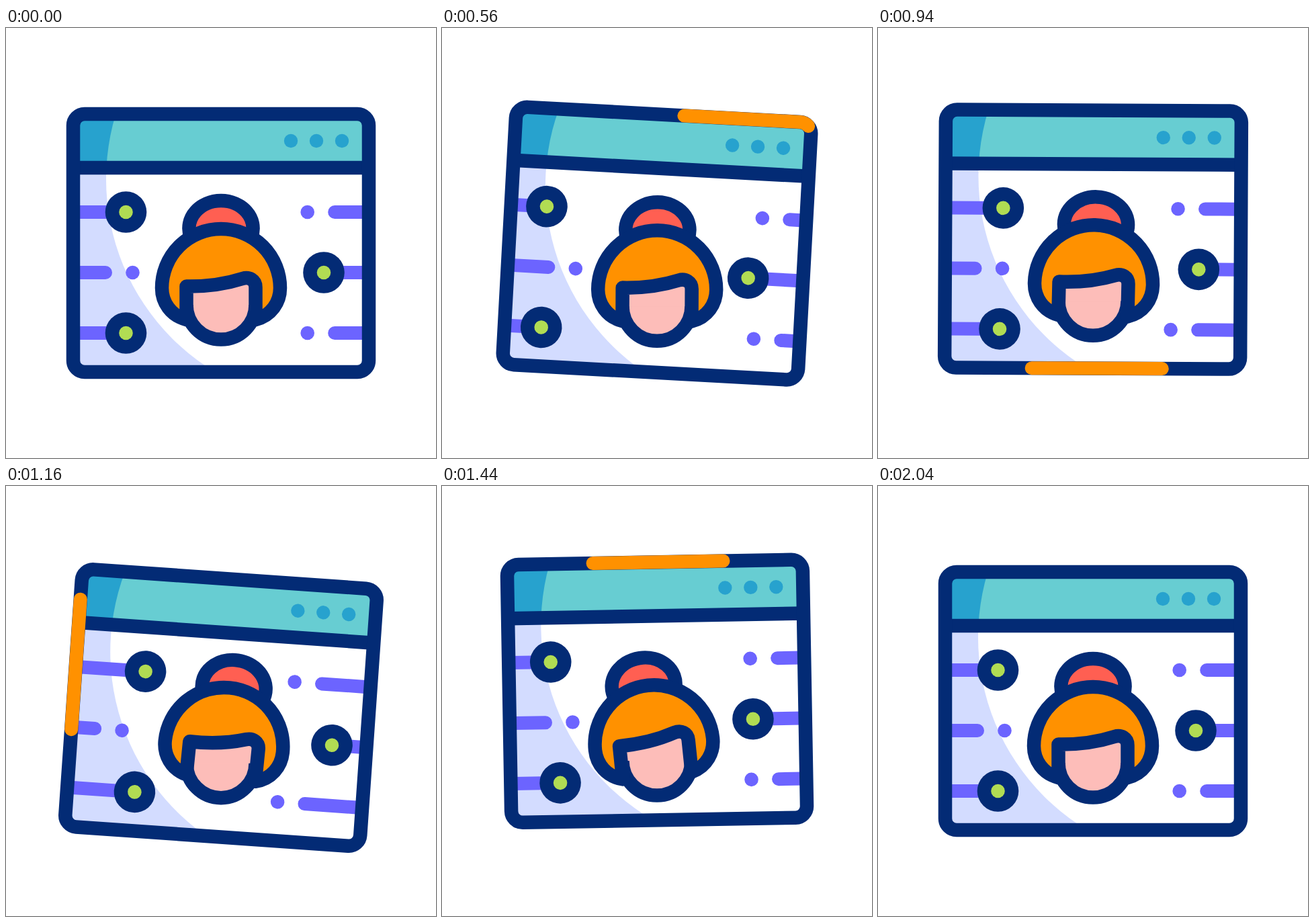
An HTML page that plays this animation: 640x640 px, repeating every 2.26 s.

```html
<!DOCTYPE html>
<html lang="en">
<head>
<meta charset="utf-8">
<title>Avatar editor window</title>
<style>
  html, body { margin: 0; width: 100%; height: 100%; overflow: hidden; background: #fff; }
  svg { display: block; width: 100%; height: 100%; }
  .line { fill: none; stroke: #032b75; stroke-width: 20.5; stroke-linejoin: round; }
  .rail { stroke: #6c64ff; stroke-width: 20; stroke-linecap: round; }
  .bead { fill: #6c64ff; }
  .navy { fill: #032b75; }
  .green { fill: #b1dc53; }
  .skin { fill: #fdbdb9; }
</style>
</head>
<body>
<svg viewBox="0 0 640 640">
  <defs>
    <clipPath id="pane"><rect x="100" y="128" width="440" height="384" rx="17"/></clipPath>
    <mask id="shade">
      <rect width="640" height="640" fill="#fff"/>
      <circle cx="484" cy="225" r="335" fill="#000"/>
    </mask>
  </defs>

  <g id="win">
    <g clip-path="url(#pane)">
      <rect x="100" y="128" width="440" height="384" fill="#fff"/>
      <rect x="100" y="128" width="440" height="80" fill="#67cdd2"/>
      <g mask="url(#shade)">
        <rect x="100" y="128" width="300" height="80" fill="#27a2ce"/>
        <rect x="100" y="208" width="300" height="304" fill="#d3dcff"/>
      </g>
    </g>
    <g fill="#27a2ce">
      <circle cx="424" cy="168" r="10.2"/>
      <circle cx="462" cy="168" r="10.2"/>
      <circle cx="500" cy="168" r="10.2"/>
    </g>
    <g id="sliders"></g>
    <path class="line" d="M100 208H540"/>
    <rect class="line" x="100" y="128" width="440" height="384" rx="17"/>
    <path id="comet" fill="none" stroke="#ff9100" stroke-width="20" stroke-linecap="round"/>
    <g id="knobs"></g>
  </g>

  <g id="head">
    <g id="bun">
      <path class="line" style="fill:#ff5f52" d="M275 312C264 282 290 257 320 257S376 282 365 312"/>
    </g>
    <path id="brow" class="skin" d="M268.5 420V384.5C300 385 330 380 352 373C362 370 371.5 375 371.5 386V420Z"/>
    <path class="line" style="fill:#fdbdb9" d="M268.5 412A51.5 51.5 0 0 0 371.5 412"/>
    <path id="hair" class="line" style="fill:#ff9100" d="M268.5 434C245 428 232 408 232 387A88 88 0 0 1 408 387C408 408 395 428 371.5 434V386C371.5 375 362 370 352 373C330 380 300 385 268.5 384.5Z"/>
  </g>
</svg>

<script>
const LOOP = 2260, STEP = 20;
const $ = id => document.getElementById(id);

function add(parent, tag, attrs) {
  const el = document.createElementNS('http://www.w3.org/2000/svg', tag);
  for (const k in attrs) el.setAttribute(k, attrs[k]);
  return parent.appendChild(el);
}

// Smooth curve through [time, value] keys that never overshoots them.
function track(keys) {
  const rise = keys.slice(1).map(([t, v], i) => (v - keys[i][1]) / (t - keys[i][0]));
  const slope = keys.map((_, i) => {
    const a = rise[i - 1] || 0, b = rise[i] || 0;
    return a * b > 0 ? 2 * a * b / (a + b) : 0;
  });
  return t => {
    if (t <= keys[0][0]) return keys[0][1];
    const i = keys.findIndex(k => k[0] > t) - 1;
    if (i < 0) return keys[keys.length - 1][1];
    const [t0, v0] = keys[i], [t1, v1] = keys[i + 1];
    const d = t1 - t0, p = (t - t0) / d, q = 1 - p;
    return v0 * (1 + 2 * p) * q * q + v1 * (3 - 2 * p) * p * p
      + d * p * q * (slope[i] * q - slope[i + 1] * p);
  };
}

const winY = track([[100, 0], [428, 19.5], [756, -33.5], [1084, 14], [1412, -15], [1740, 0]]);
const winTilt = track([[100, 0], [240, -2.5], [480, 4], [800, -1.6], [1160, 4], [1440, -1], [1740, 0]]);
const headY = track([[100, 0], [420, 16.4], [745, -19], [1070, 1.5], [1410, -3.2], [1720, 7], [2040, 0]]);
const headTilt = track([[100, 0], [420, 2.8], [745, -3.6], [1130, 6.1], [1430, -6], [1725, 5.95], [2040, 0]]);

// Orange streak along the border, measured from the top left corner.
const FROM = 233, TO = 2025, LENGTH = 194;
const streak = track([[300, FROM], [380, 251], [740, 693], [1160, 1563], [1440, 1923], [1740, 2217], [1750, 2225]]);
const lap = 'H523A17 17 0 0 1 540 145V495A17 17 0 0 1 523 512H117A17 17 0 0 1 100 495V145A17 17 0 0 1 117 128';
$('comet').setAttribute('d', 'M117 128' + lap + lap);

// Sliders: wall the rail grows from, bead x, y, knob or bead, five offsets.
const sliders = [
  [105, 178.5, 274, true, [-22.5, -18, 25.6, -16, -15.2]],
  [105, 188.5, 364, false, [10, 10, -13.2, 5.2, 11]],
  [105, 178.5, 454, true, [-17.5, -20.5, 22, -4.8, -21.5]],
  [535, 448.7, 274, false, [19, 22.4, -22, 10.8, 28.3]],
  [535, 473, 364, true, [-12.8, -10.8, 15.5, -10.8, -11.7]],
  [535, 448.7, 454, false, [19, 17.4, -35, 9.5, 17.6]]
].map(([wall, x, y, knob, [a, b, c, d, e]]) => {
  const gap = knob ? 0 : wall < 320 ? -40.5 : 40.5;
  const rail = add($('sliders'), 'line', { class: 'rail', x1: wall, x2: x + gap, y1: y, y2: y });
  const g = add($(knob ? 'knobs' : 'sliders'), 'g', {});
  if (knob) add(g, 'circle', { class: 'navy', cx: x, cy: y, r: 30.8 });
  add(g, 'circle', { class: knob ? 'green' : 'bead', cx: x, cy: y, r: 10.3 });
  const shift = track([[100, 0], [380, a], [550, (a + b) * 0.625], [740, b], [1130, c * 1.02],
    [1160, c], [1440, d], [1600, (d + e) * 0.625], [1740, e], [2040, 0]]);
  return t => {
    const s = shift(t);
    rail.setAttribute('x2', x + gap + s);
    g.setAttribute('transform', `translate(${s} 0)`);
  };
});

function draw(t) {
  $('win').setAttribute('transform', `translate(0 ${winY(t)}) rotate(${winTilt(t)} 320 320)`);
  sliders.forEach(move => move(t));

  const tip = streak(t);
  const tail = Math.max(FROM, tip - LENGTH), len = Math.min(TO, tip) - tail;
  const comet = $('comet');
  comet.style.display = len > 0 ? '' : 'none';
  comet.style.strokeDasharray = `${Math.max(len, 0.1)} 9999`;
  comet.style.strokeDashoffset = -tail;

  const tilt = headTilt(t), turn = a => `rotate(${a} 320 430)`;
  $('head').setAttribute('transform', `translate(0 ${headY(t)})`);
  $('hair').setAttribute('transform', turn(tilt));
  $('brow').setAttribute('transform', turn(tilt));
  $('bun').setAttribute('transform', turn(tilt * 1.45));
}

const start = performance.now();
function tick() {
  const t = (performance.now() - start) % LOOP;
  draw(Math.floor(t / STEP) * STEP);
  requestAnimationFrame(tick);
}
tick();
</script>
</body>
</html>
```
